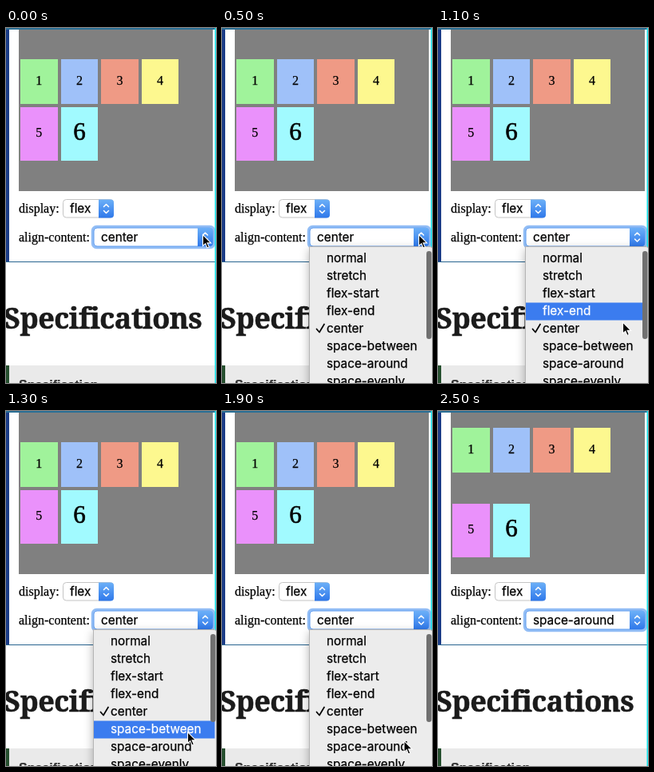
These frames come from a looping animation (263 px wide and 444 px high, 3.1 s). An HTML page:

```html
<!DOCTYPE html>
<html lang="en">
<head>
<meta charset="utf-8">
<style>
html, body { margin: 0; width: 100%; height: 100%; overflow: hidden; background: #fff; }
svg { display: block; }
text { fill: currentColor; stroke: currentColor; stroke-width: .25px; }
.serif { font: 16px "Liberation Serif", serif; }
.ui { font: 15.3px Inter, sans-serif; }
.big { font-size: 31px; stroke-width: .6px; }
.mid { text-anchor: middle; }
.head { font: bold 36px "Noto Serif", serif; letter-spacing: -.5px; color: #1b1b1b; stroke-width: .6px; }
.label { font: bold 16px "Liberation Sans", sans-serif; color: #333; }
.cell { shape-rendering: crispEdges; }
</style>
</head>
<body>
<svg width="263" height="444" viewBox="0 0 263 444">
  <defs>
    <linearGradient id="blue" x2="0" y2="1">
      <stop stop-color="#6cb0f8"/><stop offset="1" stop-color="#2f78ea"/>
    </linearGradient>
    <g id="knob">
      <path d="M0 0H15Q19 0 19 4V19Q19 23 15 23H0Z" fill="url(#blue)"/>
      <path d="M6.500 9L9.500 6L12.500 9M6.500 14L9.500 17L12.500 14" fill="none" stroke="#fff" stroke-width="1.500" stroke-linecap="round" stroke-linejoin="round"/>
    </g>
    <filter id="shade" x="-20%" y="-20%" width="140%" height="140%">
      <feDropShadow dx="0" dy="4" stdDeviation="6" flood-opacity=".3"/>
    </filter>
  </defs>

  <rect width="4" height="293" fill="#1b3c87"/>
  <rect width="263" height="2" fill="#2b6f95"/>
  <rect y="292" width="263" height="1" fill="#28648f"/>
  <rect x="16" y="2" width="243" height="202" fill="#808080"/>
  <g id="row0"></g>
  <g id="row1"></g>

  <text class="serif" x="16" y="231">display:</text>
  <rect x="71.500" y="214.500" width="63" height="22.500" rx="4" fill="#fff" stroke="#c4c4c4"/>
  <use href="#knob" x="116" y="214.500"/>
  <text class="ui" x="80" y="231">flex</text>

  <text class="serif" x="16" y="267">align-content:</text>
  <rect x="108.500" y="248.500" width="152" height="26" rx="5" fill="#fff" stroke="#92bdf5" stroke-width="3.500"/>
  <rect x="110" y="250" width="149" height="23" rx="4" fill="#fff" stroke="#5f9cf0"/>
  <use href="#knob" x="240" y="250"/>
  <text class="ui" x="119" y="267" id="value"></text>

  <text class="head" x="-3" y="376">Specifications</text>
  <rect y="422" width="263" height="22" fill="#eaeaea"/>
  <rect y="422" width="4" height="22" fill="#26502f"/>
  <text class="label" x="16" y="452">Specification</text>
  <rect x="261.500" width="1.500" height="444" fill="#19e6ee"/>

  <g id="menu">
    <path d="M109.500 273.500H260Q264 273.500 264 278V450H109.500Z" fill="#ececec" stroke="#b5b5b5" filter="url(#shade)"/>
    <rect id="bar" x="110" width="151.500" height="22" fill="#3b7cef"/>
    <g id="items" class="ui"></g>
    <path id="tick" d="M118.500 376.500L122 380.500L128 370.500" fill="none" stroke="currentColor" stroke-width="1.700" stroke-linecap="round" stroke-linejoin="round"/>
    <rect x="256" y="279" width="6.500" height="110" rx="3.250" fill="#707070"/>
  </g>
  <path id="arrow" d="M0 0V14L3.300 11.200L5.400 16.400L7.800 15.400L5.600 10.400H10.200Z" stroke="#fff" stroke-width="1.100"/>
</svg>
<script>
const $ = id => document.getElementById(id);
const names = ["normal", "stretch", "flex-start", "flex-end", "center",
  "space-between", "space-around", "space-evenly"];
const colors = ["#a0f39b", "#9fc1f9", "#ef9a85", "#fdf88f", "#ea91fb", "#a1faff"];
const LOOP = 3100, OPEN = 300, CLOSE = 2100, HIDE = 2500, CENTER = 4, AROUND = 6;

// start time, pointer x, pointer y, highlighted item (-1: none)
const steps = [
  [0, 246.5, 258.5, -1],
  [800, 243.5, 286, 0],
  [900, 239.5, 315, 1],
  [1000, 235.5, 342, 2],
  [1100, 231.5, 368, 3],
  [1200, 229, 388, 4],
  [1300, 227.5, 401.5, 5],
  [1400, 227.5, 404.5, 5],
  [1500, 227.5, 407.5, 5],
  [1600, 227.5, 410.5, 6],
  [1700, 228, 412.5, 6],
  [1900, 228, 412.5, -1],
  [2000, 228, 412.5, 6],
];

colors.forEach((color, i) => {
  const row = i < 4 ? 0 : 1, x = 18 + (i % 4) * 50.6;
  const y = row ? 99 : 39, big = i === 5;
  $("row" + row).innerHTML +=
    `<rect class="cell" x="${x}" y="${y}" width="46.6" height="${row ? 67 : 56}" fill="${color}"/>
     <text class="serif mid ${big ? "big" : ""}" x="${x + 23.3}" y="${big ? 140 : row ? 136 : 71}">${i + 1}</text>`;
});
$("items").innerHTML = names.map((name, i) =>
  `<text x="131" y="${293 + 22 * i}">${name}</text>`).join("");

function draw(now) {
  const t = now % LOOP;
  const [, x, y, hot] = steps.findLast(step => step[0] <= t);
  const done = t >= CLOSE;

  $("row0").setAttribute("transform", `translate(0 ${done ? -18 : 0})`);
  $("row1").setAttribute("transform", `translate(0 ${done ? 17.4 : 0})`);
  $("value").textContent = names[done ? AROUND : CENTER];
  $("menu").style.display = t >= OPEN && !done ? "" : "none";
  $("bar").style.display = hot < 0 ? "none" : "";
  $("bar").setAttribute("y", 277.5 + 22 * hot);
  [...$("items").children].forEach((item, i) =>
    item.style.color = i === hot ? "#fff" : "#000");
  $("tick").style.color = hot === CENTER ? "#fff" : "#000";
  $("arrow").style.display = t < HIDE ? "" : "none";
  $("arrow").setAttribute("transform", `translate(${x} ${y})`);
  requestAnimationFrame(() => draw(performance.now()));
}
draw(performance.now());
</script>
</body>
</html>
```
